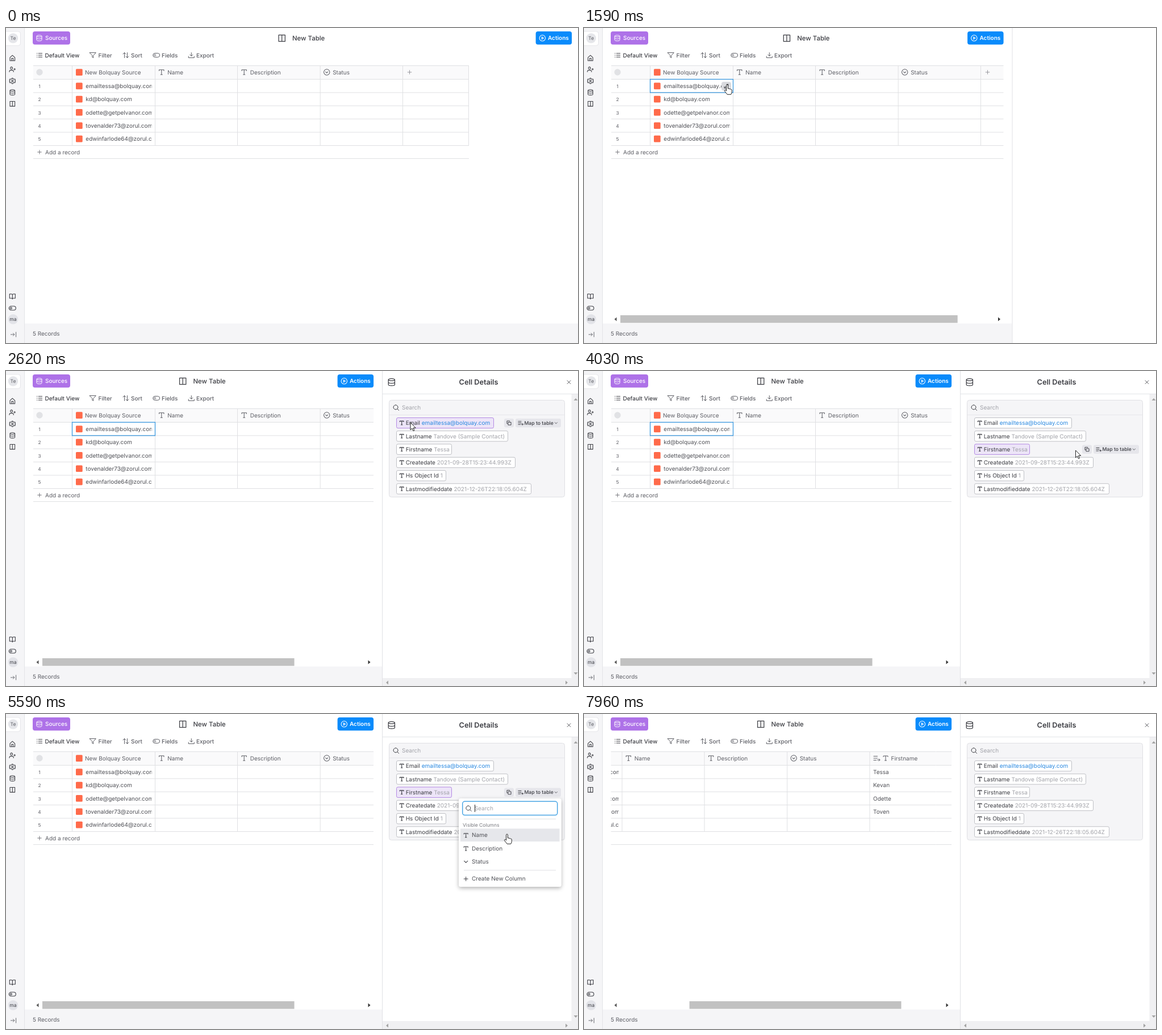
These frames come from a looping animation (1007 by 556 pixels, 8000 ms). An HTML page:

```html
<!DOCTYPE html>
<html lang="en">
<head>
<meta charset="utf-8">
<title>Map a field to a table</title>
<style>
  html, body { margin: 0; width: 100%; height: 100%; overflow: hidden; background: #fff; }
  svg { display: block; width: 100%; height: 100%; }
  text { font-family: Inter, sans-serif; text-rendering: geometricPrecision; white-space: pre; }
  .chip rect { fill: #fff; stroke: #bfc0c5; }
  .chip.hover rect { fill: #ede5f8; stroke: #b48ae4; }
</style>
</head>
<body>
<svg id="stage" viewBox="0 0 1007 556"></svg>
<script>
const LOOP = 8000;
const ROW = 23.3, COLUMN = 145.4, CHIP = 23.25;
const OPEN_WIDTH = 1011, NARROW_WIDTH = 662;
const SLIDE_START = 1177, SLIDE_END = 1800;
const DARK = '#3c3d43', BODY = '#505157', MID = '#5e5f66', PALE = '#a2a3a9', LINE = '#dfe0e3', BAR = '#f5f5f7';

// Icons on a 24 unit grid
const ICONS = {
  home: 'M3 10l9-8 9 8v12H3zM9 22v-9h6v9',
  userPlus: 'M16 21v-2a4 4 0 0 0-4-4H5a4 4 0 0 0-4 4v2M8.5 3a4 4 0 1 0 .1 0M20 8v6M17 11h6',
  gear: 'M12 9a3 3 0 1 0 .1 0M10 2h4l1 3 3 1 3-1 2 4-2 3 2 3-2 4-3-1-3 1-1 3h-4l-1-3-3-1-3 1-2-4 2-3-2-3 2-4 3 1 3-1z',
  database: 'M3 5a9 3 0 1 0 18 0a9 3 0 1 0-18 0v14a9 3 0 0 0 18 0V5M3 12a9 3 0 0 0 18 0',
  columns: 'M3 3h18v18H3zM12 3v18',
  book: 'M2 3h6a4 4 0 0 1 4 4v14a3 3 0 0 0-3-3H2zM22 3h-6a4 4 0 0 0-4 4v14a3 3 0 0 1 3-3h7z',
  toggle: 'M7 5h10a7 7 0 0 1 0 14H7A7 7 0 0 1 7 5M7 9a3 3 0 1 0 .1 0',
  expandBar: 'M2 12h14M11 7l5 5-5 5M22 3v18',
  list: 'M8 5h14M8 12h14M8 19h14M2 5h1M2 12h1M2 19h1',
  funnel: 'M1 3h22l-9 10v8l-4-2v-6z',
  sort: 'M7 3v18M2 8l5-5 5 5M17 21V3M12 16l5 5 5-5',
  download: 'M12 3v12M7 10l5 5 5-5M2 16v5h20v-5',
  type: 'M4 7V4h16v3M12 4v16M9 20h6',
  select: 'M12 2a10 10 0 1 0 .1 0M8 10.5l4 4 4-4',
  play: 'M12 2a10 10 0 1 0 .1 0M10 8l6 4-6 4z',
  plus: 'M12 4v16M4 12h16',
  close: 'M5 5l14 14M19 5L5 19',
  search: 'M11 3a8 8 0 1 0 .1 0M17 17l5 5',
  copy: 'M9 9h12v12H9zM5 15H3V3h12v2',
  map: 'M1 5h13M1 12h13M1 19h9M14 18h9M19 14l4 4-4 4',
  chevron: 'M5 9l7 7 7-7',
  expand: 'M14 4h6v6M20 4l-7 7M10 20H4v-6M4 20l7-7'
};

const icon = (name, x, y, size = 12, color = MID, weight = 2) =>
  `<path d="${ICONS[name]}" transform="translate(${x - size / 2} ${y - size / 2}) scale(${size / 24})"
    fill="none" stroke="${color}" stroke-width="${weight}" stroke-linecap="round" stroke-linejoin="round"/>`;
const text = (s, x, y, { size = 10, color = DARK, weight = 400, anchor = 'start' } = {}) =>
  `<text x="${x}" y="${y + size * .36}" font-size="${size}" font-weight="${weight}" fill="${color}" text-anchor="${anchor}">${s}</text>`;
const rect = (x, y, w, h, fill, radius = 0, extra = '') =>
  `<rect x="${x}" y="${y}" width="${w}" height="${h}" rx="${radius}" fill="${fill}" ${extra}/>`;
const line = (x1, y1, x2, y2, color = LINE) => `<path d="M${x1} ${y1}L${x2} ${y2}" stroke="${color}"/>`;
const group = (id, content, extra = '') => `<g id="${id}" ${extra}>${content}</g>`;
const arrow = (x, y, angle, color) =>
  `<path d="M-2 -3.5L2 0L-2 3.5z" fill="${color}" transform="translate(${x} ${y}) rotate(${angle})"/>`;
const each = (items, draw) => items.map(draw).join('');

const emails = ['emailtessa@bolquay.com', 'kd@bolquay.com', 'odette@getpelvanor.com',
  'tovenalder73@zorul.com', 'edwinfarlode64@zorul.com'];
const firstNames = ['Tessa', 'Kevan', 'Odette', 'Toven'];
const rowY = i => 102.3 + ROW * i;
const rules = [66.5, 90.5, 114, 137.3, 160.6, 184, 207.5, 230.5];

const sidebar = () => rect(0, 0, 32, 556, BAR) + line(32.5, 0, 32.5, 556, '#e3e4e8') +
  rect(-5, 6, 30.5, 25, '#fff', 4, 'stroke="#e6e6ea"') +
  `<circle cx="12.5" cy="18" r="8.7" fill="#e5e6ea"/>` +
  text('Te', 12.5, 18, { size: 8.6, color: MID, anchor: 'middle' }) +
  each(['home', 'userPlus', 'gear', 'database', 'columns'], (n, i) => icon(n, 11.3, 53 + 20.2 * i, 11.5, DARK, 2.2)) +
  icon('book', 11.3, 474, 12, DARK, 2.2) + icon('toggle', 11.3, 494.5, 12, DARK, 2.2) +
  `<circle cx="12.5" cy="514" r="8.8" fill="#e2e3e8"/>` +
  text('ma', 12.5, 513.5, { size: 8.6, anchor: 'middle' }) + icon('expandBar', 13, 541, 11, MID);

const toolbar = () => rect(47, 6, 66, 23.3, '#ae72e8', 4) + icon('database', 58.5, 17.8, 12, '#fff') +
  text('Sources', 69, 17.7, { color: '#fff', weight: 500 }) +
  icon('list', 59, 48, 11, DARK, 2.2) + text('Default View', 68.5, 48, { weight: 500 }) +
  each([['funnel', 152.8, 'Filter', 162.5], ['sort', 211, 'Sort', 220], ['toggle', 264.7, 'Fields', 274],
    ['download', 326.3, 'Export', 335]], ([n, x, label, tx]) =>
    icon(n, x, 48, 12, MID) + text(label, tx, 48, { color: MID, weight: 500 })) +
  group('title', icon('columns', 485.7, 18, 15, DARK) + text('New Table', 504, 18, { size: 11.4, weight: 500 })) +
  group('actions', rect(-78.4, 6, 63.5, 23.3, '#0a8bfb', 4) + icon('play', -66.7, 17.8, 12.5, '#fff') +
    text('Actions', -57, 17.7, { color: '#fff', weight: 600 }));

const heading = (name, label, x) => icon(name, x + 11.5, 78, 12.5, MID) + text(label, x + 22, 78, { color: MID });
const source = (x, y) => rect(x, y - 5.8, 11.7, 11.7, '#ff6a4a', 1.5);

const table = () => rect(48, 66, 767, 24, '#fafafb') + each(rules, y => line(48, y, 815, y)) +
  each([116.5, 262.5, 407.5, 553.2, 698.5], x => line(x, 66, x, 207.5)) +
  `<circle cx="59" cy="78" r="5.7" fill="#e1e2e5"/>` + source(123, 78) +
  text('New Bolquay Source', 139, 78, { color: MID }) +
  heading('type', 'Name', 262.3) + heading('type', 'Description', 407.7) + heading('select', 'Status', 553.2) +
  each(emails, (email, i) => text(i + 1, 59, rowY(i) + .8, { size: 8.3, color: MID, anchor: 'middle' }) +
    source(123, rowY(i)) + `<g clip-path="url(#cellClip)">${text(email, 140.3, rowY(i), { color: BODY })}</g>`) +
  icon('plus', 59, 219, 10, MID) + text('Add a record', 69, 219, { color: MID }) +
  group('plusColumn', icon('plus', 710.5, 78, 10, '#85868c') + line(814.5, 66, 814.5, 207.5)) +
  group('newColumn', rect(815, 66, COLUMN, 24, '#fafafb') + each(rules, y => line(815, y, 960, y)) +
    icon('map', 711, 78, 12, MID) + icon('type', 726.5, 78, 12, MID) + text('Firstname', 736, 78, { color: MID }) +
    each(firstNames, (name, i) => text(name, 704.5, rowY(i), { color: BODY }))) +
  group('selection', rect(116.5, 90.5, 146, 23.5, 'none', 0, 'stroke="#2f92dc" stroke-width="1.2"')) +
  group('expandButton', rect(242, 95, 17, 15.5, '#d9dade', 4) + icon('expand', 250.5, 102.7, 10, DARK, 2.4));

const scrollbar = () => group('scrollbar', arrow(55.5, 514, 180, '#555') +
  rect(64, 507, 100, 13.5, '#c1c1c1', 0, 'id="thumb"') + group('scrollEnd', arrow(-22.5, 514, 0, '#333')));

const fields = [['Email', 'emailtessa@bolquay.com', 858.5], ['Lastname', 'Tandove (Sample Contact)', 883.5],
  ['Firstname', 'Tessa', 784.5], ['Createdate', '2021-09-28T15:23:44.993Z', 896.5],
  ['Hs Object Id', '1', 774.5], ['Lastmodifieddate', '2021-12-26T22:18:05.604Z', 924.5]];

const panel = () => icon('database', 678.8, 19.7, 15, DARK) +
  text('Cell Details', 832, 19.5, { size: 12.7, weight: 600, anchor: 'middle' }) +
  icon('close', 991, 19.7, 10, DARK) + line(663, 40.5, 1007, 40.5, '#e3e4e8') +
  rect(995.5, 41, 12, 515, '#f0f0f2') + rect(663, 542, 333, 14, '#f0f0f2') +
  arrow(1003, 50, -90, '#a3a3a3') + arrow(1003, 534, 90, '#a3a3a3') +
  arrow(671, 550, 180, '#a3a3a3') + arrow(987, 550, 0, '#a3a3a3') +
  rect(674.5, 51.5, 309, 171, BAR, 4, 'stroke="#dfe0e4"') + line(675, 77.5, 983, 77.5, '#e7e7eb') +
  icon('search', 686.5, 64.5, 12, DARK) + text('Search', 697, 64.5, { color: PALE }) +
  each(fields, ([label, value, right], i) => {
    const y = 91.7 + CHIP * i, color = i ? PALE : '#2888e0';
    return `<g class="chip">${rect(687.5, y - 9.2, right - 687.5, 18.4, '#fff', 2.5)}` +
      icon('type', 696.7, y, 10, DARK, 2.8) +
      text(`${label} <tspan fill="${color}">${value}</tspan>`, 703.7, y) + '</g>';
  }) +
  group('rowButtons', rect(877, 84, 17, 15.5, '#e6e6eb', 3) + icon('copy', 885.5, 91.7, 9.5, DARK, 2.4) +
    rect(897, 84, 80, 15.5, '#e6e6eb', 3) + icon('map', 906.2, 91.7, 9.5, DARK, 2.4) +
    text('Map to table', 912.5, 91.7, { size: 8.64, weight: 500 }) + icon('chevron', 968.3, 91.7, 7.5, DARK, 2.6));

const menuItems = [['type', 'Name', 213.7], ['type', 'Description', 237], ['chevron', 'Status', 260],
  ['plus', 'Create New Column', 290.3]];
const menu = () => rect(797, 149, 180.5, 156, '#fff', 4, 'filter="url(#shadow)"') +
  rect(803.7, 154.3, 167, 24.3, '#fff', 4, 'id="menuSearch"') + icon('search', 814.3, 166.5, 12, DARK) +
  text('Search', 824.7, 166.3, { color: PALE }) + rect(825, 160, 1, 13, '#222', 0, 'id="caret"') +
  line(806, 185.3, 968, 185.3) + text('Visible Columns', 804, 196, { size: 8.5, color: '#77787e' }) +
  rect(800, 0, 174.5, 22.8, '#e6e7eb', 0, 'id="menuHover"') + line(806, 275.8, 968, 275.8) +
  each(menuItems, ([name, label, y]) => icon(name, 809.7, y + .6, 10.5, DARK, 2.3) + text(label, 820, y, { color: BODY }));

const stage = document.getElementById('stage');
stage.innerHTML = `<defs>
  <clipPath id="cellClip"><rect x="117" y="90" width="139.5" height="120"/></clipPath>
  <clipPath id="tableClip"><rect id="tableView" x="47.5" y="60" height="180"/></clipPath>
  <filter id="shadow" x="-15%" y="-15%" width="130%" height="130%">
    <feDropShadow dx="0" dy="2.5" stdDeviation="3.6" flood-opacity=".3"/></filter></defs>` +
  rect(0, 0, 1007, 556, '#fff') + rect(33, 521.5, 974, 35, BAR) + text('5 Records', 47, 539.5, { color: MID }) +
  sidebar() + toolbar() + `<g clip-path="url(#tableClip)">${group('table', table())}</g>` + scrollbar() +
  group('panelBack', rect(0, 0, 400, 556, '#fff') + line(.5, 0, .5, 556, '#e0e1e5')) +
  group('panel', panel()) + group('menu', menu()) +
  group('toast', rect(455, 14, 96, 24.5, '#494a57', 3) +
    text('Adding Field', 502.7, 26, { color: '#fff', weight: 500, anchor: 'middle' })) +
  group('cursor', `<path id="pointer" d="M0 0v13l3-2.8 2 4.6 2-.9-2-4.4h4.2z"/>
    <path id="hand" d="M-1.4 10V1.5a1.4 1.4 0 0 1 2.8 0V7q2.2-.6 2.6.6 2-.5 2.4.7 1.9-.3 1.9 1.4v3q0 2-1.6 4.6H.2Q-1.5 15-4.4 11.4q-.8-1.5.6-1.9 1.2-.1 2.4 1.5z"/>`,
    'fill="#fff" stroke="#222" stroke-linejoin="round"');

const $ = id => document.getElementById(id);
const show = (id, visible) => { $(id).style.display = visible ? '' : 'none'; };
const move = (id, x, y = 0) => $(id).setAttribute('transform', `translate(${x} ${y})`);
const set = (id, attributes) => { for (const key in attributes) $(id).setAttribute(key, attributes[key]); };
const chips = stage.querySelectorAll('.chip');

// Pointer way points: time, x, y
const path = [[230, 932, 543], [480, 650, 335], [780, 310, 145], [990, 252, 100], [1870, 252, 100],
  [2100, 420, 96], [2400, 660, 91], [2620, 712, 91], [3010, 712, 91], [3080, 713, 109], [3550, 713, 109],
  [3760, 729, 142], [3890, 729, 142], [4030, 865, 140], [4230, 956, 136], [4400, 956, 136], [4650, 935, 152],
  [5120, 829, 208], [5320, 882, 212], [6300, 882, 212], [6800, 873, 288], [7070, 873, 288],
  [7140, 891, 338], [7630, 921, 556]];

function pointerAt(t) {
  const next = path.findIndex(p => p[0] > t);
  if (next < 1) return path.at(next).slice(1);
  const [t0, x0, y0] = path[next - 1], [t1, x1, y1] = path[next];
  const p = (t - t0) / (t1 - t0);
  return [x0 + (x1 - x0) * p, y0 + (y1 - y0) * p];
}

function render(t) {
  const [x, y] = pointerAt(t);
  const mapped = t >= 7960, menuOpen = t >= 4440 && !mapped, focused = t < 6930;
  const s = Math.min(1, Math.max(0, (t - SLIDE_START) / (SLIDE_END - SLIDE_START)));
  const width = OPEN_WIDTH + (NARROW_WIDTH - OPEN_WIDTH) * s * s * (3 - 2 * s);

  move('title', (width - OPEN_WIDTH) / 2);
  move('actions', width);
  move('panelBack', width);
  show('panel', t >= 1870);

  const scroll = mapped ? 195.5 : 0, content = 767 + (mapped ? COLUMN : 0);
  const view = width - 62.5, track = view - 32;
  set('tableView', { width: view });
  move('table', -scroll);
  move('plusColumn', mapped ? COLUMN : 0);
  show('newColumn', mapped);
  show('scrollbar', view < content);
  set('thumb', { x: 64 + track * scroll / content, width: track * Math.min(1, view / content) });
  move('scrollEnd', width);
  show('selection', t >= 1060 && t < 4370);
  const overCell = t >= 960 && x < 262;
  show('expandButton', overCell);

  const overPanel = t >= 1870 && x > 674 && !mapped;
  const row = !overPanel ? -1 : menuOpen ? 2 : Math.floor((y - 80) / CHIP);
  chips.forEach((chip, i) => chip.classList.toggle('hover', i === row));
  show('rowButtons', row >= 0);
  move('rowButtons', 0, CHIP * row);

  show('menu', menuOpen);
  set('menuSearch', focused ? { stroke: '#4aa5e4', 'stroke-width': 1.5 } : { stroke: '#c9cace', 'stroke-width': 1 });
  show('caret', focused && Math.floor((t - 4530) / 530) % 2 === 0);
  const item = y > 301 ? menuItems[3] : menuItems.find(m => Math.abs(y - m[2]) < 11.6);
  show('menuHover', !!item);
  if (item) set('menuHover', { y: item[2] - 11.4 });
  show('toast', t >= 6930 && !mapped);
  $('toast').style.opacity = Math.min(1, (t - 6860) / 200);

  const overButton = row === 2 && !menuOpen && x > 877;
  const hand = overCell || overButton || (menuOpen && !!item && y < 301);
  show('cursor', t >= 230 && t < 7630);
  show('hand', hand);
  show('pointer', !hand);
  move('cursor', x, y);
}

function tick() {
  render(performance.now() % LOOP);
  requestAnimationFrame(tick);
}
tick();
</script>
</body>
</html>
```
